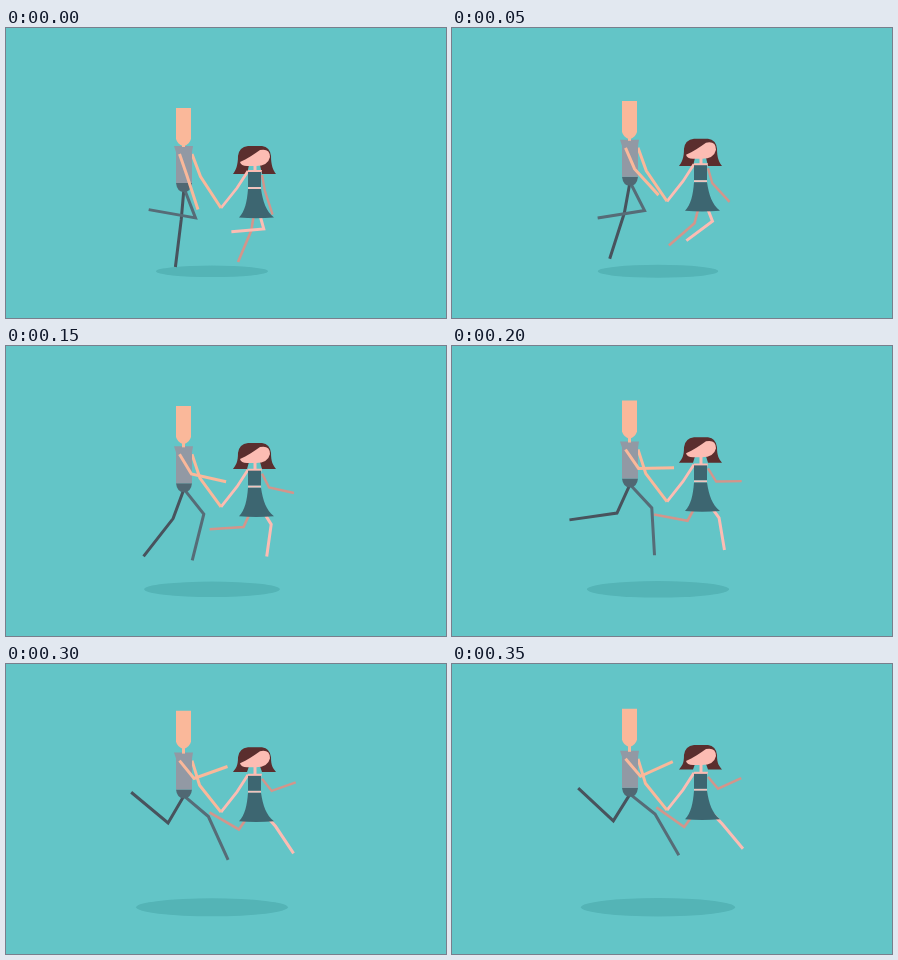
An HTML page with a canvas that plays this animation: 440 px wide and 290 px high, repeating every 400 ms.

```html
<!DOCTYPE html>
<html lang="en">
<head>
<meta charset="utf-8">
<title>Couple skipping</title>
<style>
  html, body { margin: 0; width: 100%; height: 100%; overflow: hidden; background: #63c5c7; }
  canvas { display: block; }
</style>
</head>
<body>
<canvas id="stage" width="440" height="290"></canvas>
<script>
const ctx = document.getElementById('stage').getContext('2d');
const LOOP = 400, STEP = 50;
const COLOR = {
  sky: '#63c5c7', shadow: '#54b4b6',
  skin: '#fab89a', shirt: '#9299a4', shorts: '#506873',
  farLeg: '#48535d', nearLeg: '#566c77',
  girl: '#fcbcb3', girlFar: '#d3958b', hair: '#5b2e2e', dress: '#3d6671'
};

function smooth(from, to, t) {
  const k = Math.min(1, Math.max(0, (t - from) / (to - from)));
  return k * k * (3 - 2 * k);
}

function line(points, color, width) {
  ctx.strokeStyle = color;
  ctx.lineWidth = width;
  ctx.beginPath();
  for (const [x, y] of points) ctx.lineTo(x, y);
  ctx.stroke();
}

// Point at a distance and an angle in degrees, clockwise from the right.
function reach([x, y], length, angle) {
  const a = angle * Math.PI / 180;
  return [x + length * Math.cos(a), y + length * Math.sin(a)];
}

function limb(root, upper, upperAngle, lower, lowerAngle, color, width = 3) {
  const joint = reach(root, upper, upperAngle);
  line([root, joint, reach(joint, lower, lowerAngle)], color, width);
}

function shape(d, color, y = 0) {
  ctx.save();
  ctx.translate(0, y);
  ctx.fillStyle = color;
  ctx.fill(new Path2D(d));
  ctx.restore();
}

function drawShadow(rise) {
  ctx.fillStyle = COLOR.shadow;
  ctx.beginPath();
  ctx.ellipse(206, 243.3, 56 + 21.4 * rise, 5.8 + 3.5 * rise, 0, 0, Math.PI * 2);
  ctx.fill();
}

function drawGirl(rise, bend, hand) {
  const head = 118 - 37.7 * rise;
  const body = 142 - 34.8 * rise;
  const tip = 28 - 3.5 * rise;
  const hip = [250, body + 31];

  limb(hip, 30, 99 + 28 * rise, 34, 113 + 104 * bend, COLOR.girlFar, 2.6);
  limb(hip, 29, 74.5 - 29 * rise, 32.5, 175 - 127 * bend, COLOR.girl);
  limb([256, body + 5], 15.5, 80 - 31 * rise, 25.5, 72 - 98 * bend, COLOR.girlFar, 2.4);

  shape(`M242 0 H256 Q264 1 265 10 C265 19 267 ${tip - 4} 270 ${tip}
    H256 L254 19 H243 L241 ${tip} H227
    C230 ${tip - 4} 232 19 232 10 Q233 1 242 0 Z`, COLOR.hair, head);
  shape('M234 16 C241 13 248 8 254 4 Q264 2 264 11 Q262 20 250 20 H241 Q235 20 234 16 Z',
    COLOR.girl, head);
  ctx.fillStyle = COLOR.girl;
  ctx.fillRect(247.5, head + 19, 3, body - head - 17);

  line([hand, [231, body + 18], [242, body + 1]], COLOR.girl, 2.8);
  shape('M242 0 H256 L255 4 H242 Z', COLOR.girl, body);
  shape('M242 2 H255 V17 H242 Z', COLOR.dress, body);
  shape('M242 17 H255 V19 H242 Z', '#efc4be', body);
  shape('M242 19 H255 C257 32 260 41 268 47.5 Q250 49 233 47.5 C239 41 241 32 242 19 Z',
    COLOR.dress, body);
}

function drawMan(t, rise, bend, hand) {
  const head = 80 - 36 * rise;
  const shirt = 118 - 31.8 * rise;
  const hip = [178, 160 - 30.5 * rise];
  const farShin = 97 + 55 * rise + 72 * smooth(145, 255, t);
  const nearShin = 190 - 98 * rise - 34 * smooth(100, 160, t);

  limb(hip, 31.5, 95 + 27.5 * rise, 48, farShin, COLOR.farLeg);
  limb(hip, 32, 69 - 31 * rise, 47.5, nearShin, COLOR.nearLeg);
  line([[186, shirt + 8], [194.5 - rise, 148.5 - 29.5 * rise], hand], COLOR.skin, 3);

  shape('M170 37 H186 Q185 46 178 46 Q171 46 170 37 Z', COLOR.shorts, shirt);
  shape('M168 0 H187 L186 6 V37 H170 V6 Z', COLOR.shirt, shirt);
  ctx.fillStyle = COLOR.skin;
  ctx.fillRect(176, head + 36, 3, shirt - head - 35);
  shape('M170 0 H185 V31 Q183.5 36 178.5 38 H176.5 Q171.5 36 170 31 Z', COLOR.skin, head);
  limb([173.5, shirt + 8], 23, 71 - 22 * rise, 35.5, 72 - 98 * bend, COLOR.skin);
}

function draw(t) {
  const rise = Math.sin(t / LOOP * Math.PI / 2);
  const bend = rise ** 0.85;
  const hand = [215, 180 - 34.5 * rise];
  ctx.fillStyle = COLOR.sky;
  ctx.fillRect(0, 0, 440, 290);
  drawShadow(rise);
  drawGirl(rise, bend, hand);
  drawMan(t, rise, bend, hand);
}

const start = performance.now();
function tick() {
  const t = (performance.now() - start) % LOOP;
  draw(Math.floor(t / STEP) * STEP);
  requestAnimationFrame(tick);
}
tick();
</script>
</body>
</html>
```
